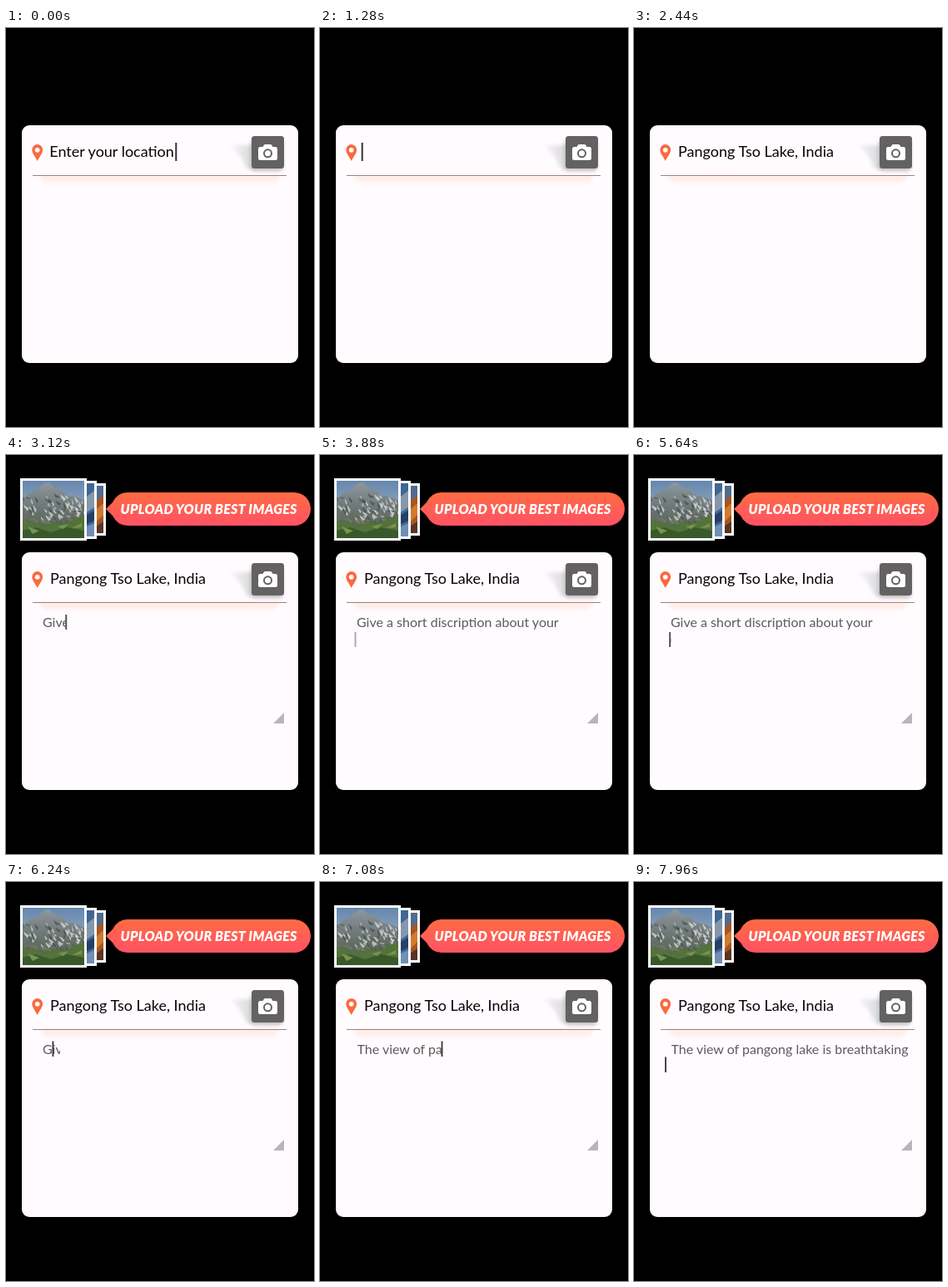
Animation of 370x480 px, one loop 8000 ms. Source, as an HTML page:

```html
<!DOCTYPE html>
<html lang="en">
<head>
<meta charset="utf-8">
<title>Location form</title>
<style>
html, body { margin: 0; width: 100%; height: 100%; overflow: hidden; background: #000; }
svg { display: block; width: 370px; height: 480px; }
text { font-family: Lato, sans-serif; white-space: pre; }
.title { font-size: 18px; fill: #060606; }
.note { font-size: 16px; fill: #5c5a5c; }
.cta { font-size: 16px; font-weight: 900; font-style: italic; fill: #fff; }
</style>
</head>
<body>
<svg viewBox="0 0 370 480">
  <defs>
    <linearGradient id="warm" x1="0" y1="0" x2="0" y2="1">
      <stop offset="0" stop-color="#ff6b42"/><stop offset="1" stop-color="#ff5265"/>
    </linearGradient>
    <linearGradient id="sky" x1="0" y1="0" x2="0" y2="1">
      <stop offset="0" stop-color="#6587ad"/><stop offset="1" stop-color="#b8c4d0"/>
    </linearGradient>
    <linearGradient id="rock" x1="0" y1="0" x2="0" y2="1">
      <stop offset="0" stop-color="#8d979f"/><stop offset=".55" stop-color="#67706c"/><stop offset="1" stop-color="#4c5b3c"/>
    </linearGradient>
    <linearGradient id="glow" x1="0" y1="0" x2="0" y2="1">
      <stop offset="0" stop-color="#ffe3d6" stop-opacity=".9"/><stop offset="1" stop-color="#ffe3d6" stop-opacity="0"/>
    </linearGradient>
    <linearGradient id="shade" x1="0" y1="0" x2="1" y2="0">
      <stop offset="0" stop-color="#ccd0d0" stop-opacity=".3"/><stop offset="1" stop-color="#bfc4c4"/>
    </linearGradient>
    <filter id="soft" x="-50%" y="-50%" width="200%" height="200%"><feGaussianBlur stdDeviation="2"/></filter>
    <clipPath id="photo"><rect x="20" y="31" width="74" height="69"/></clipPath>
  </defs>

  <g id="media">
    <rect x="90" y="34" width="30" height="63" fill="#fff"/>
    <rect x="90" y="37" width="27" height="57" fill="#a65520"/>
    <path d="M108 37h9v12l-9 6z" fill="#526b8c"/>
    <path d="M108 66l9-8v14l-9 9z" fill="#d17a2c"/>
    <path d="M108 86l9-6v14h-9z" fill="#5a3322"/>
    <rect x="80" y="31" width="29" height="70" fill="#fff"/>
    <rect x="80" y="34" width="26" height="64" fill="#3f6795"/>
    <path d="M97 50l9-7v20l-9 6z" fill="#8497ab"/>
    <path d="M97 72l9-5v12l-9 4z" fill="#263f66"/>
    <path d="M97 86l9-4v16h-9z" fill="#6f8fb4"/>
    <rect x="17" y="28" width="80" height="75" fill="#fff"/>
    <g clip-path="url(#photo)">
      <rect x="20" y="31" width="74" height="69" fill="url(#sky)"/>
      <path d="M20 53l8-7 9-4 9-8 6-1 6 6 8 1 8 9 9 1 11 5v45H20z" fill="url(#rock)"/>
      <g id="patches"></g>
      <path d="M20 79l13 3 13 4 12-5 13 2 12-7 11-3v27H20z" fill="#53733a"/>
      <path d="M20 91l16-4 18 6 19-6 21 4v9H20z" fill="#39592b"/>
      <path d="M26 86l14 5-8 4zM62 86l13-3-6 6zM79 88l12-6v5z" fill="#789250"/>
    </g>
    <path d="M120 65L128 57Q134 45 146 45H346A20 20 0 0 1 346 85H146Q134 85 128 73Z" fill="url(#warm)"/>
    <text class="cta" x="137.500" y="71" letter-spacing=".25">UPLOAD YOUR BEST IMAGES</text>
  </g>

  <rect x="19" y="117" width="332" height="286" rx="9" fill="#fffbff"/>
  <path d="M40 178H329L320 189H50Z" fill="url(#glow)" filter="url(#soft)"/>
  <path d="M32 177.500H337" stroke="#98827f"/>
  <path d="M270 141H297V170H290L282 155Z" fill="url(#shade)" opacity=".65" filter="url(#soft)"/>
  <rect x="294" y="134" width="39" height="38" rx="5" fill="#999" opacity=".6" filter="url(#soft)"/>
  <rect x="295" y="130" width="39" height="39" rx="3.500" fill="#636161"/>
  <path d="M305.500 143H308.500L310 140.500Q310.500 140 311.500 140H317.500Q318.500 140 319 140.500L320.500 143H323.500Q326 143 326 145.500V156.500Q326 159 323.500 159H305.500Q303 159 303 156.500V145.500Q303 143 305.500 143Z" fill="#fff"/>
  <circle cx="314.500" cy="150.800" r="4.500" fill="none" stroke="#636161" stroke-width="2"/>
  <path d="M37.700 160C35.500 155 31.300 151 31.300 146.500A6.400 6.400 0 0 1 44.100 146.500C44.100 151 39.900 155 37.700 160Z" fill="#fb693f"/>
  <circle cx="37.700" cy="146.800" r="2.900" fill="#fffbff"/>

  <path id="grip" d="M334 310V323H321Z" fill="#b7b5b7"/>
  <g id="lines"></g>
  <rect id="caret" width="2" fill="#333"/>
</svg>
<script>
const LOOP = 8000;
const NS = 'http://www.w3.org/2000/svg';
const $ = id => document.getElementById(id);
const clamp = v => Math.min(1, Math.max(0, v));
const mix = (a, b, p) => a + (b - a) * p;
const ramp = (t, a, b) => clamp((t - a) / (b - a));
const ease = (t, a, b) => { const p = ramp(t, a, b); return p * p * (3 - 2 * p); };
const dip = (t, mid, half) => 1 - clamp(1.3 - Math.abs(t - mid) / half);

function add(parent, tag, attrs) {
  const el = document.createElementNS(NS, tag);
  for (const k in attrs) el.setAttribute(k, attrs[k]);
  return parent.appendChild(el);
}

// Snow and shadow patches on the mountain
let seed = 11;
const rnd = () => (seed = seed * 16807 % 2147483647) / 2147483647;
for (let i = 0; i < 90; i++) {
  const x = 20 + rnd() * 74, y = 45 + Math.abs(x - 52) * .13 + rnd() * 34;
  const w = 2 + rnd() * 5, h = 1 + rnd() * 5;
  const fill = i % 3 ? (y < 74 ? '#d9dde0' : '#71805f') : '#454f4e';
  add($('patches'), 'path', { d: `M${x} ${y}l${w} ${h}l${-w * .4} ${h * .6}l${-w * .5} ${-h}z`, fill, opacity: .75 });
}

// A line of text revealed from the left up to a moving edge
function makeLine(id, cls, x, y, str) {
  const clip = add(document.querySelector('defs'), 'clipPath', { id });
  const box = add(clip, 'rect', { x: x + .6, y: y - 20, height: 30, width: 0 });
  add($('lines'), 'text', { class: cls, x, y, 'clip-path': `url(#${id})` }).textContent = str;
  return edge => box.setAttribute('width', Math.max(0, edge - x - .6));
}
const prompt = makeLine('c0', 'title', 52.3, 155, 'Enter your location');
const place = makeLine('c1', 'title', 53, 155, 'Pangong Tso Lake, India');
const hint1 = makeLine('c2', 'note', 44, 207, 'Give a short discription about your');
const hint2 = makeLine('c3', 'note', 43.5, 227, 'experience...');
const review = makeLine('c4', 'note', 44.5, 207, 'The view of pangong lake is breathtaking');

const x = {
  prompt: t => mix(203.3, 49.7, ease(t, 40, 810)),
  place: t => mix(49.7, 243, ease(t, 1350, 2310)),
  hint1: t => t < 4500 ? mix(41, 290, ease(t, 2960, 3700)) : mix(290, 37, ease(t, 5690, 6350)),
  hint2: t => t < 4800 ? mix(41.5, 131.5, ease(t, 3920, 4560)) : mix(131.5, 41, ease(t, 5090, 5680)),
  review: t => mix(37, 330.5, ease(t, 6780, 7510))
};

// [x, y, height, opacity, colour]
function caretAt(t) {
  if (t < 1340) return [x.prompt(t), 138, 22, dip(t, 1060, 150), '#333'];
  if (t < 2480) return [x.place(t), 138, 22, 1 - ramp(t, 2310, 2420), '#333'];
  if (t < 3740) return [x.hint1(t), 192, 18, ramp(t, 2640, 2760), '#555'];
  if (t < 5690) return [x.hint2(t), 213, 18, ramp(t, 3790, 3980) * dip(t, 4710, 140), '#555'];
  if (t < 6780) return [x.hint1(t), 191.5, 18.5, dip(t, 6580, 140), '#444'];
  if (t < 7520) return [x.review(t), 191.5, 18.5, 1, '#444'];
  return [37, 210.5, 18.5, ramp(t, 7600, 7720), '#444'];
}

function draw(t) {
  prompt(t < 820 ? x.prompt(t) + 2 : 0);
  place(t < 1350 ? 0 : x.place(t) + 1);
  hint1(t < 2960 || t > 6370 ? 0 : x.hint1(t < 4500 ? t : t - 25) + 1);
  hint2(t < 3920 || t > 5700 ? 0 : x.hint2(t < 4800 ? t : t - 20) + 1);
  review(t < 6780 ? 0 : x.review(t) + 1);
  $('media').setAttribute('opacity', ramp(t, 2480, 2560));
  $('grip').setAttribute('opacity', ramp(t, 2600, 2760));
  const [cx, cy, h, o, fill] = caretAt(t);
  const attrs = { x: cx, y: cy, height: h, opacity: o, fill };
  for (const k in attrs) $('caret').setAttribute(k, attrs[k]);
}

const start = performance.now();
function tick(now) {
  draw(Math.max(0, now - start) % LOOP);
  requestAnimationFrame(tick);
}
draw(0);
requestAnimationFrame(tick);
</script>
</body>
</html>
```
